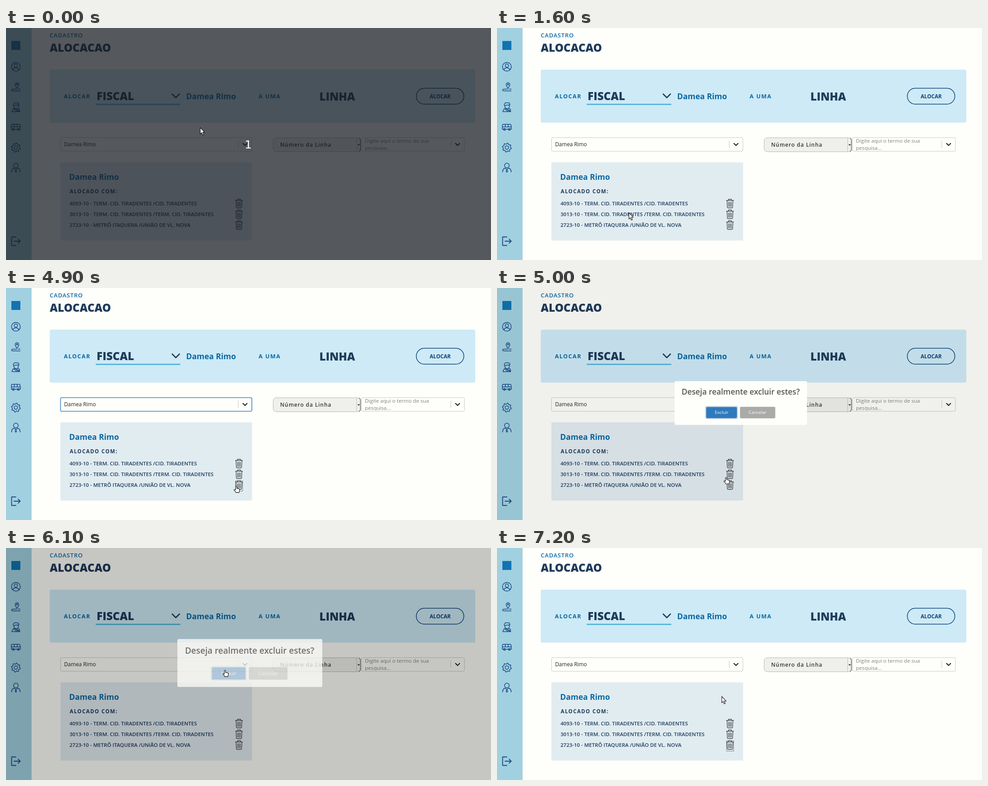
These frames come from a looping animation (1081x518 px, 8 s). An HTML page:

```html
<!DOCTYPE html>
<html lang="pt">
<head>
<meta charset="utf-8">
<title>Alocação</title>
<style>
  html, body { margin: 0; width: 100%; height: 100%; overflow: hidden; background: #fefefa; }
  svg { display: block; width: 100%; height: 100%; font-family: "Open Sans", "Noto Sans", sans-serif; }
  .big { font-size: 24.4px; font-weight: 800; fill: #1f3b5b; }
  .name { font-size: 17.5px; font-weight: 700; fill: #0a68a3; }
  .label { font-size: 12.6px; font-weight: 700; letter-spacing: 1.5px; fill: #0a68a3; }
  .row { font-size: 11.54px; font-weight: 600; fill: #1f3b5b; }
  .field { font-size: 11.8px; font-weight: 500; fill: #222; }
  .hint { font-size: 11.6px; font-weight: 500; fill: #80807e; }
  .btn { font-size: 12.25px; fill: #fff; text-anchor: middle; }
  .line { fill: none; stroke-linecap: round; stroke-linejoin: round; }
  .icons { stroke: #174a85; stroke-width: 1.5; }
  .box { fill: #fefefa; stroke: #c6c6c3; }
  .cursor { fill: #fff; stroke: #111; stroke-width: 1.1; stroke-linejoin: round; }
</style>
</head>
<body>
<svg viewBox="0 0 1081 518" preserveAspectRatio="none">
  <defs>
    <g id="trash" class="line" stroke="#2b2f33" stroke-width="1.2">
      <path d="M-8 -6.5H8M-3.5 -6.8V-9.4H3.5V-6.8M-6.5 -6.2L-5.8 8.5Q-5.7 10 -4.2 10H4.2Q5.7 10 5.8 8.5L6.5 -6.2M-2.9 -3V7M0 -3V7M2.9 -3V7"/>
    </g>
    <path id="down" class="line" d="M-4.5 -2.2L0 2.3L4.5 -2.2" stroke="#222" stroke-width="2.2"/>
    <clipPath id="hintClip"><rect x="793" y="246" width="198" height="27.5"/></clipPath>
  </defs>

  <rect width="1081" height="518" fill="#fefefa"/>
  <rect width="57" height="518" fill="#a1d0e0"/>
  <rect x="12" y="29" width="20" height="20" fill="#1173b1"/>

  <g class="line icons">
    <g transform="translate(22 86.5)">
      <circle r="9.8"/><circle cy="-2.6" r="3.7"/><path d="M-6.5 7Q-5.5 2.6 0 2.6T6.5 7"/>
    </g>
    <g transform="translate(22 132)">
      <path d="M2.5 2.5Q-1.5 -2.5 -1.5 -5.8A4 4 0 0 1 6.5 -5.8Q6.5 -2.5 2.5 2.5Z"/>
      <circle cx="2.5" cy="-6" r="1.2"/>
      <path d="M2 4.5H-6Q-9.5 4.5 -9.5 6.5T-6 8.5H9.5M5 4.5H9.5"/>
    </g>
    <g transform="translate(22 177)">
      <path d="M-6 -6L-4 -9.5Q1 -11 6 -9L7 -5.5L-5 -4ZM-4.5 -4V-1Q-3 3 1 3T5.5 -1V-5"/>
      <path d="M-9 9.8L-6.5 4L-2.5 2.5L7.5 9.8ZM4 2.5L8 4.5L8.5 9.8M-5 3.5L3 9.8M0 4L7 8"/>
    </g>
    <g transform="translate(22 221.5)">
      <path d="M-10 4.5V-4Q-10 -6.5 -7.5 -6.5H7Q9 -6.5 9.4 -4L10 0V4.5H-10M-10 -.8H10M-3.5 -6.5V-.8M3 -6.5V-.8"/>
      <circle cx="-5.5" cy="5" r="2"/><circle cx="5.5" cy="5" r="2"/>
    </g>
    <g transform="translate(22 267)">
      <path id="gear"/><circle r="3.8"/>
    </g>
    <g transform="translate(22 312)">
      <circle cy="-5" r="5.2"/>
      <path d="M-9.5 9.5Q-9.5 1.5 -3.5 1L0 4L3.5 1Q9.5 1.5 9.5 9.5M0 4L-1.6 8L0 10L1.6 8Z"/>
    </g>
    <path d="M22 466.5H12.5V485.5H22M18 476H31.5M27 471.3L31.7 476L27 480.7" stroke-width="1.8"/>
  </g>

  <text x="97.5" y="21" class="label" style="font-size:12.9px;font-weight:600;letter-spacing:.85px">CADASTRO</text>
  <text x="97.5" y="52.5" class="big">ALOCACAO</text>

  <rect x="97.5" y="93" width="948.5" height="118.3" rx="4" fill="#cdeaf6"/>
  <text x="129" y="157.3" class="label">ALOCAR</text>
  <text x="202" y="160.6" class="big">FISCAL</text>
  <rect x="200" y="169" width="188.5" height="3" fill="#5ab7dc"/>
  <path class="line" d="M370.5 147.5L378.5 155.5L386.5 147.5" stroke="#1f3b5b" stroke-width="2.6"/>
  <text x="401.5" y="158.8" class="name">Damea Rimo</text>
  <text x="563" y="157.3" class="label">A UMA</text>
  <text x="698.5" y="162.3" class="big">LINHA</text>
  <rect x="914.5" y="134.5" width="106" height="35.5" rx="17.7" fill="none" stroke="#0f4479" stroke-width="1.5"/>
  <text x="967.7" y="156.6" text-anchor="middle" font-size="11.7" font-weight="700" fill="#0f4479">ALOCAR</text>

  <rect id="picker" class="box" x="121.5" y="244.8" width="426.5" height="30.4" rx="3"/>
  <text x="129.5" y="264" class="field">Damea Rimo</text>
  <path d="M517.5 251.5V268" stroke="#c6c6c3"/>
  <use href="#down" x="532.7" y="260"/>

  <rect x="595.5" y="245" width="195" height="31.3" rx="7" fill="#efefeb" stroke="#b5b5b2"/>
  <path d="M781.5 246V275.5" stroke="#c0c0bc"/>
  <path class="line" d="M787 246Q790 247 790 251V271Q790 274.5 787 275.5" stroke="#777" stroke-width="1.5"/>
  <path d="M783.2 259.8H789L786.1 262.8Z" fill="#222"/>
  <text x="611" y="265.3" font-size="12" font-weight="600" letter-spacing=".93" fill="#333">Número da Linha</text>

  <rect class="box" x="792.3" y="244.8" width="229.5" height="30.4" rx="3"/>
  <g class="hint" clip-path="url(#hintClip)">
    <text x="800" y="255.8">Digite aqui o termo de sua</text>
    <text x="800" y="271.9">pesquisa...</text>
  </g>
  <path d="M991.5 251.5V268" stroke="#c6c6c3"/>
  <use href="#down" x="1006.5" y="260"/>

  <rect x="121.3" y="300" width="427" height="174.5" fill="#e1ecf1"/>
  <text x="140.8" y="339.2" class="name">Damea Rimo</text>
  <text x="142" y="368.7" class="row" style="font-weight:700;letter-spacing:1.43px">ALOCADO COM:</text>
  <g class="row">
    <text x="141.5" y="395.7">4093-10 - TERM. CID. TIRADENTES /CID. TIRADENTES</text>
    <text x="141.5" y="419.6">3013-10 - TERM. CID. TIRADENTES /TERM. CID. TIRADENTES</text>
    <text x="141.5" y="443.5">2723-10 - METRÔ ITAQUERA /UNIÃO DE VL. NOVA</text>
  </g>
  <use href="#trash" x="519.3" y="391.7"/>
  <use href="#trash" x="519.3" y="415.7"/>
  <use href="#trash" x="519.3" y="439.7"/>
  <rect id="focus" x="511.5" y="430.5" width="16" height="23" fill="none" stroke="#333" stroke-dasharray="1.2 1"/>

  <rect id="shade" width="1081" height="518"/>
  <g id="modal">
    <rect x="360" y="196" width="367" height="121.6" rx="3.6" fill="#fefefb"/>
    <text x="543" y="233.5" text-anchor="middle" font-size="21.6" font-weight="600" fill="#575757">Deseja realmente excluir estes?</text>
    <g id="buttons">
      <rect x="444.9" y="265.2" width="90.2" height="36" rx="4.5" fill="#adc1d5"/>
      <rect x="446.2" y="266.5" width="87.6" height="33.4" rx="4" fill="#fefefb"/>
      <rect x="447.2" y="267.5" width="85.6" height="31.4" rx="3" fill="#2f7abd"/>
      <rect x="541" y="267.2" width="98" height="32" rx="3" fill="#aaaaa8"/>
      <text x="490.2" y="287.5" class="btn">Excluir</text>
      <text x="589.8" y="287.5" class="btn">Cancelar</text>
    </g>
  </g>

  <g id="intro">
    <rect width="1081" height="518" fill="rgb(22,25,33)" opacity=".72"/>
    <text x="540" y="268.5" text-anchor="middle" font-family="DejaVu Sans, sans-serif" font-size="25" fill="#fff">1</text>
  </g>

  <path id="arrow" class="cursor" d="M.5 .5V14.6L3.7 11.6L6 17L8.3 16L6 10.8H10.3Z"/>
  <path id="hand" class="cursor" d="M4.2 9V1.6A1.3 1.3 0 0 1 6.8 1.6V5.4Q8 4.6 9 5.8Q10.2 5.2 11 6.5Q13 6.2 13 8.2V10.5L12 14.6H4.8L4 12.2L.8 9.6Q.4 7.6 2.2 7.8Z"/>
</svg>
<script>
const LOOP = 8000, STEP = 100;
const $ = id => document.getElementById(id);
const clamp = v => Math.min(1, Math.max(0, v));
const show = (id, on) => $(id).setAttribute("visibility", on ? "visible" : "hidden");

// pointer path: [ms, x, y]
const path = [
  [0, 432.5, 222], [800, 486, 238], [1100, 486, 238], [1400, 372, 385], [1500, 372, 385],
  [1600, 293.5, 412], [1700, 221, 437], [2000, 220, 437], [2300, 290, 423], [2400, 290, 423],
  [2700, 314, 382], [3000, 336, 406], [3300, 404, 414], [3400, 404, 414], [3800, 492, 441],
  [3900, 492, 441], [4300, 514, 442], [4900, 514, 442], [5600, 497, 307], [5700, 497, 307],
  [5800, 489, 272.5], [6100, 489, 272.5], [6200, 488, 257], [6300, 488, 257], [6400, 500, 327],
  [6800, 500, 327], [6900, 500, 329], [7000, 500, 329], [7200, 500.5, 331]
];
const pop = [[0, .7], [.45, 1.05], [.8, .95], [1, 1]];

function track(keys, t) {
  const i = keys.findIndex(k => k[0] > t);
  if (i < 0) return keys[keys.length - 1].slice(1);
  const a = keys[i - 1], b = keys[i], p = (t - a[0]) / (b[0] - a[0]);
  return a.slice(1).map((v, n) => v + (b[n + 1] - v) * p);
}

function gearPath() {
  const pts = [];
  for (let i = 0; i < 32; i++) {
    const a = (i + .5) * Math.PI / 16, r = i % 4 < 2 ? 10 : 7.9;
    pts.push((r * Math.cos(a)).toFixed(2) + " " + (r * Math.sin(a)).toFixed(2));
  }
  return "M" + pts.join("L") + "Z";
}

function draw(t) {
  const intro = 1 - clamp(t / 800);
  $("intro").setAttribute("opacity", intro);

  const picked = t >= 4800 && t < 5000;
  $("picker").style.stroke = picked ? "#4484c4" : "";
  $("picker").style.strokeWidth = picked ? 1.6 : "";
  show("focus", picked || t >= 6900);

  const opening = clamp((t - 4960) / 300), closing = clamp((t - 6064) / 150);
  const open = t >= 5000 && t < 6200;
  const scale = closing ? 1 - closing / 2 : track(pop, opening)[0];
  show("modal", open);
  show("shade", open);
  $("shade").setAttribute("opacity", .4 * opening * (1 - clamp((t - 6064) / 80)));
  $("modal").setAttribute("opacity", 1 - closing);
  $("modal").setAttribute("transform", `translate(543.5 256.8) scale(${scale}) translate(-543.5 -256.8)`);
  $("buttons").setAttribute("opacity", closing ? .4 : 1);

  const [x, y] = track(path, t);
  const hand = t >= 4200 && t < 5100 || t >= 5800 && t < 6200;
  show("hand", hand);
  show("arrow", !hand);
  $("arrow").setAttribute("transform", `translate(${x} ${y})`);
  $("hand").setAttribute("transform", `translate(${x - 6.5} ${y})`);
}

function frame() {
  const t = performance.now() % LOOP;
  draw(Math.floor(t / STEP) * STEP);
  requestAnimationFrame(frame);
}

$("gear").setAttribute("d", gearPath());
frame();
</script>
</body>
</html>
```
